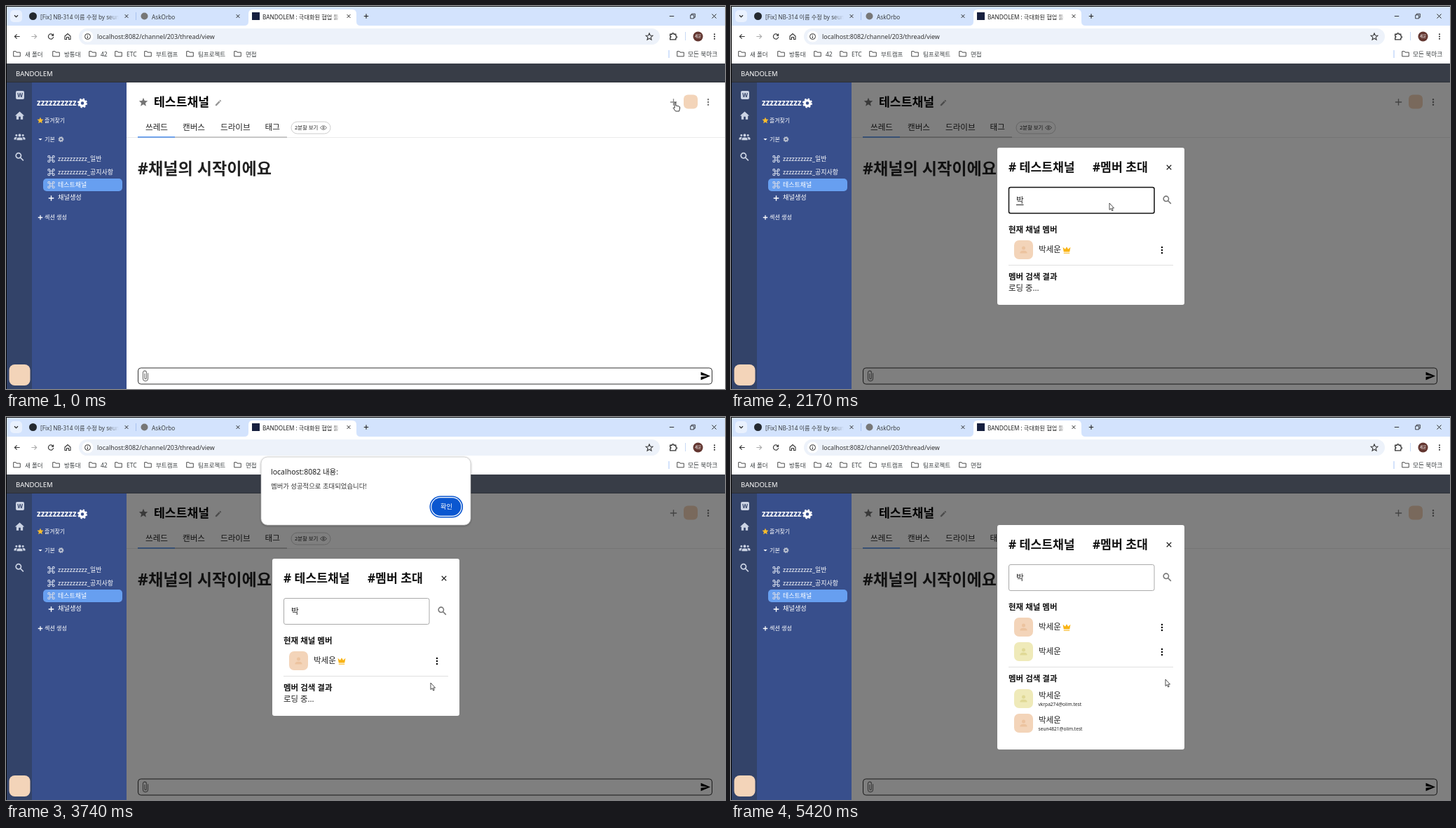
Recreate the animation shown at these times as an HTML page. Size 1026 by 546 pixels, loop 6.28 s.

```html
<!DOCTYPE html>
<html lang="ko">
<head>
<meta charset="utf-8">
<title>Channel invite</title>
<style>
html, body { margin: 0; width: 100%; height: 100%; overflow: hidden; background: #fff; }
svg { display: block; width: 100vw; height: 100vh; font-family: "Noto Sans", "Noto Sans CJK KR", "Noto Sans CJK", sans-serif; }
text { white-space: pre; }
</style>
</head>
<body>
<svg id="stage" viewBox="0 0 1026 546" preserveAspectRatio="none"></svg>
<script>
const LOOP = 6280;
const stage = document.getElementById('stage');

const ICONS = {
  home: 'M10 20v-6h4v6h5v-8h3L12 3 2 12h3v8z',
  person: 'M12 12a4 4 0 1 0 0-8 4 4 0 0 0 0 8zm0 2c-2.7 0-8 1.3-8 4v2h16v-2c0-2.7-5.3-4-8-4z',
  group: 'M12 11.5a3 3 0 1 0 0-6 3 3 0 0 0 0 6zm0 1.5c-3 0-6 1.3-6 3.5V19h12v-2.500c0-2.200-3-3.500-6-3.500zM5 11a2.300 2.300 0 1 0 0-4.600A2.300 2.300 0 0 0 5 11zm14 0a2.300 2.300 0 1 0 0-4.600 2.300 2.300 0 0 0 0 4.600zM5 12.500c-2.500 0-5 1-5 3V18h4.500c0-2.500.5-4 2-5.300zm14 0c2.500 0 5 1 5 3V18h-4.500c0-2.500-.5-4-2-5.300z',
  star: 'M12 17.3l6.200 3.700-1.600-7L22 9.200l-7.200-.6L12 2 9.200 8.600 2 9.200 7.500 14l-1.700 7z',
  pencil: 'M3 17.200V21h3.800L17.800 9.900l-3.700-3.700zM20.700 7a1 1 0 0 0 0-1.400l-2.300-2.300a1 1 0 0 0-1.400 0l-1.900 1.800 3.800 3.800z',
  send: 'M2 21L23 12 2 3v7l15 2-15 2z',
  crown: 'M5 16L3 5l5.500 5L12 4l3.500 6L21 5l-2 11zm0 2h14v2H5z',
  dots: 'M12 8a2 2 0 1 0 0-4 2 2 0 0 0 0 4zm0 6a2 2 0 1 0 0-4 2 2 0 0 0 0 4zm0 6a2 2 0 1 0 0-4 2 2 0 0 0 0 4z',
  caret: 'M5 9h14l-7 7z'
};
const LINES = {
  search: 'M15 9.500a5.500 5.500 0 1 1-11 0 5.500 5.500 0 0 1 11 0zM13.500 13.500L20 20',
  command: 'M9 9V6.500A2.500 2.500 0 1 0 6.500 9H17.500A2.500 2.500 0 1 0 15 6.500V17.500A2.500 2.500 0 1 0 17.500 15H6.500A2.500 2.500 0 1 0 9 17.500z',
  plus: 'M12 5v14M5 12h14',
  cross: 'M6 6l12 12M18 6L6 18',
  chevron: 'M6 9l6 6 6-6',
  back: 'M20 12H5M11 5l-7 7 7 7',
  forward: 'M4 12h15M13 5l7 7-7 7',
  reload: 'M19 8A8 8 0 1 0 20 13M20 3v6h-6',
  house: 'M4 11l8-7 8 7v9h-5v-6H9v6H4z',
  folder: 'M2 5h7l2 3h11v12H2z',
  star: 'M12 17l5.500 3.500-1.500-6.500 5-4.200-6.500-.5L12 3.500 9.500 9.300l-6.500.5L8 14l-1.500 6.500z',
  puzzle: 'M4 6h5c0-4 5-4 5 0h5v5c4 0 4 5 0 5v4H4v-5c3 0 3-4 0-4z',
  eye: 'M1 12c5-9 17-9 22 0-5 9-17 9-22 0zM15 12a3 3 0 1 1-6 0 3 3 0 0 1 6 0z',
  clip: 'M17 6v11a5 5 0 0 1-10 0V5a3.500 3.500 0 0 1 7 0v11a1.800 1.800 0 0 1-3.600 0V7',
  minus: 'M5 12h14',
  restore: 'M4 8h12v12H4zM8 8V4h12v12h-4'
};

const place = (x, y, size) => `transform="translate(${x - size / 2} ${y - size / 2}) scale(${size / 24})"`;
const icon = (name, x, y, size, fill) => `<path d="${ICONS[name]}" ${place(x, y, size)} fill="${fill}"/>`;
const line = (name, x, y, size, color, width = 2) =>
  `<path d="${LINES[name]}" ${place(x, y, size)} fill="none" stroke="${color}" stroke-width="${width}"/>`;
const rect = (x, y, w, h, fill, r = 0, more = '') =>
  `<rect x="${x}" y="${y}" width="${w}" height="${h}" rx="${r}" fill="${fill}" ${more}/>`;
const dot = (x, y, r, fill, more = '') => `<circle cx="${x}" cy="${y}" r="${r}" fill="${fill}" ${more}/>`;
// y is the optical middle of the line
const text = (x, y, str, size, fill = '#111', weight = 400, more = '') =>
  `<text x="${x}" y="${y + size * .37}" font-size="${size}" fill="${fill}" font-weight="${weight}" ${more}>${str}</text>`;
const group = (id, body, more = '') => `<g id="${id}" ${more}>${body}</g>`;

function gear(x, y, r, color) {
  const tooth = 2 * Math.PI * r * .8 / 16;
  return dot(x, y, r * .56, 'none', `stroke="${color}" stroke-width="${r * .48}"`) +
    dot(x, y, r * .8, 'none', `stroke="${color}" stroke-width="${r * .4}" stroke-dasharray="${tooth}"`);
}

const PEACH = ['#f3d4b9', '#ecc39f'], LEMON = ['#efeab9', '#e0d996'];
const avatar = (y, [back, front]) => rect(404, y - 13.5, 27, 27, back, 7) + icon('person', 417.5, y, 15, front);

function browser() {
  const ink = '#3c4043';
  const folders = [[10, '새 폴더'], [66, '방통대'], [118, '42'], [155, 'ETC'], [197, '부트캠프'], [257, '팀프로젝트'], [325, '면접']];
  return rect(0, 0, 1026, 28, '#d3e3fd') + rect(0, 28, 1026, 54, '#fff') +
    rect(6, 6, 17, 17, '#e9f1fe', 5) + line('chevron', 14.5, 14.5, 10, '#222', 2.6) +
    `<path d="M340 28q6 0 6-6V11q0-6 6-6H494q6 0 6 6v11q0 6 6 6z" fill="#fff"/>` +
    dot(38.5, 14.5, 5.5, '#24292f') + dot(197.5, 14.5, 5, '#777') + rect(351, 9, 11, 11, '#17203f') +
    `<g mask="url(#tabFade)">` + text(49, 15.5, '[Fix] NB-314 이름 수정 by seun', 8.2, ink) +
    text(366, 15.5, 'BANDOLEM : 극대화된 협업 툴', 8.2, '#222') + '</g>' +
    text(208, 15.5, 'AskOrbo', 8.2, ink) +
    [172, 331, 489].map(x => line('cross', x, 14.5, 9.500, '#222', 2.4)).join('') +
    rect(185, 9, 1, 11, '#a9c3ef') + line('plus', 514, 14.5, 11, '#222', 2.4) +
    line('minus', 950, 14.5, 11, '#222') + line('restore', 980, 14.5, 10, '#222') + line('cross', 1010.5, 14.5, 12, '#222') +
    line('back', 16, 43.5, 11, '#333', 2.4) + line('forward', 40, 43.5, 11, '#aaa', 2.4) +
    line('reload', 64, 43.5, 11, '#333', 2.4) + line('house', 88, 43.5, 12, '#333', 2.2) +
    rect(104, 32, 829, 23, '#edf2fa', 11.5) + dot(116.5, 43.5, 8, '#fff') +
    dot(116.5, 43.5, 4, 'none', 'stroke="#333"') + rect(116, 43, 1, 3, '#333') + rect(116, 41, 1, 1, '#333') +
    text(130, 43.5, 'localhost:8082/channel/203/thread/view', 8.9, '#333') +
    line('star', 918, 43.5, 13, '#333') + line('puzzle', 952, 43.5, 13, '#333', 2.4) + rect(969, 37, 1, 12, '#c8d9f5') +
    dot(987.5, 43.5, 7, '#633630') + text(987.5, 43.5, '세운', 5.3, '#fff', 400, 'text-anchor="middle"') +
    icon('dots', 1011, 43.5, 13, '#333') +
    folders.map(([x, s]) => line('folder', x + 5.5, 68, 11.5, '#444') + text(x + 17, 68.5, s, 8.5, ink)).join('') +
    rect(945.5, 63, 1, 11, '#a9c8f7') + line('folder', 962.5, 68, 11.5, '#444') + text(973, 68.5, '모든 북마크', 8.7, ink);
}

function sidebar() {
  const pale = '#cbd3e3';
  return rect(0, 82, 1026, 27, '#383d47') + rect(0, 108, 1026, 1, '#2c3037') + text(14, 96.500, 'BANDOLEM', 9.5, '#fff') +
    rect(0, 109, 37, 437, '#334369') + rect(37, 109, 135, 437, '#384f8c') +
    rect(14, 121, 12, 12, pale, 2) + text(20, 127, 'W', 8, '#334369', 700, 'text-anchor="middle"') +
    icon('home', 19.5, 156.5, 16, pale) + icon('group', 19.5, 186.500, 16, pale) + line('search', 19.5, 215, 16, pale, 2.6) +
    rect(4.500, 511, 30, 30, PEACH[0], 8) +
    text(44, 138, 'zzzzzzzzzz', 11.6, '#fff', 700) + gear(109, 138.5, 7, '#fff') +
    icon('star', 49, 163, 11, '#f9bd2c') + text(55, 163, '즐겨찾기', 7.9, '#fff') +
    icon('caret', 49, 190, 9, '#fff') + text(55, 190, '기본', 8.1, '#fff') + gear(78.5, 190, 4, '#b8bfce') +
    rect(53, 246, 113, 18, '#679ff0', 5) +
    [[218, 'zzzzzzzzzz_일반'], [237, 'zzzzzzzzzz_공지사항'], [255, '테스트채널']].map(([y, s]) =>
      line('command', 64.5, y, 14, '#cdd5e6') + text(74, y, s, 8.95, '#fff')).join('') +
    line('plus', 64.5, 274, 13, '#fff', 2.5) + text(74, 273, '채널생성', 9.2, '#fff') +
    line('plus', 49, 301.5, 11, '#fff', 2.8) + text(55, 301.500, '섹션 생성', 8.1, '#fff');
}

function channel() {
  const tabs = [[199, '쓰레드'], [252, '캔버스'], [306, '드라이브'], [369.5, '태그']];
  return rect(172, 109, 854, 437, '#fff') +
    icon('star', 196, 137, 15, '#757575') + text(211, 137, '테스트채널', 17.2, '#000', 700) + icon('pencil', 303, 138, 11, '#999') +
    line('plus', 952.5, 137, 16, '#888', 2) + rect(967, 126.5, 20, 20, PEACH[0], 6) + icon('dots', 1002, 137, 15, '#777') +
    rect(172, 187, 854, 1, '#ebebeb') + rect(188, 186.5, 213, 1, '#999') + rect(188, 186, 53, 1.6, '#5b98f0') +
    tabs.map(([x, s]) => text(x, 173, s, 11.6, '#222')).join('') +
    rect(407, 165, 56, 17, '#fff', 8.500, 'stroke="#ccc"') + text(412, 173, '2분할 보기', 7.4, '#222') + line('eye', 453, 173.5, 9.5, '#444') +
    text(188, 231, '#채널의 시작이에요', 23.1, '#222', 700) +
    rect(188.5, 516, 819, 23, '#fff', 4, 'stroke="#333"') + line('clip', 199, 527.5, 17, '#777', 1.6) + icon('send', 998, 527.5, 15.500, '#000');
}

// coordinates inside the modal are relative to its top edge
function modal() {
  const member = (y, pair) => avatar(y, pair) + text(439, y - .5, '박세운', 11.5, '#222') + icon('dots', 615, y + .5, 16, '#111');
  const result = (y, pair, mail) => avatar(y, pair) + text(439, y - 5, '박세운', 11.5, '#222') + text(438.5, y + 8, mail, 6.6, '#222');
  return rect(380, 0, 267, 208, '#fff', 3, 'id="card"') +
    text(396, 28, '# 테스트채널', 17.2, '#111', 700) + text(516, 28, '#멤버 초대', 17.2, '#111', 700) +
    line('cross', 625, 28, 13, '#222', 2.2) +
    rect(396.5, 56.5, 207.500, 37, '#fff', 2.5, 'id="field" stroke="#aaa"') +
    text(407, 75, '멤버 찾기', 11.6, '#aaa', 400, 'id="query"') + rect(407, 81, 10.5, 1, '#222', 0, 'id="underline"') +
    line('search', 622.500, 74.5, 16, '#777', 2.4) +
    text(396, 116.5, '현재 채널 멤버', 11.5, '#111', 700) +
    member(145.5, PEACH) + icon('crown', 479, 146, 14.500, '#f9b414') +
    group('added', member(180.5, LEMON)) +
    group('lower', rect(396, 167, 235, 1, '#e0e0e0') + text(396, 183.5, '멤버 검색 결과', 11.5, '#111', 700) +
      group('loading', text(396, 199.5, '로딩 중...', 11.4, '#222')) +
      group('first', result(212.5, LEMON, 'vkrpa274@olim.test') +
        group('invite', dot(607, 214, 15.5, '#fff', 'id="inviteFace" filter="url(#soft)"') + line('plus', 607, 214, 16, '#222', 2.2))) +
      group('second', result(247.5, PEACH, 'seun4821@olim.test')));
}

function alertBox() {
  return rect(364, 57, 299, 97, '#fff', 9, 'stroke="#bbb" stroke-width=".6" filter="url(#soft)"') +
    text(378, 78.500, 'localhost:8082 내용:', 10.5, '#1f1f1f') + text(378, 98.5, '멤버가 성공적으로 초대되었습니다!', 9.4, '#333') +
    rect(605.3, 113.3, 46, 29.500, '#fff', 14.7, 'stroke="#0b57d0" stroke-width="1.6"') +
    rect(607.3, 115.3, 42, 25.5, '#0b57d0', 12.7, 'id="confirm"') +
    text(628.5, 128, '확인', 9.300, '#fff', 400, 'text-anchor="middle"');
}

stage.innerHTML = `<defs>
  <filter id="soft" x="-20%" y="-20%" width="140%" height="150%"><feDropShadow dx="0" dy="1" stdDeviation="1.6" flood-opacity=".35"/></filter>
  <linearGradient id="fadeOut"><stop offset="0" stop-color="#fff"/><stop offset="1" stop-color="#000"/></linearGradient>
  <mask id="tabFade" maskUnits="userSpaceOnUse" x="0" y="0" width="1026" height="30">
    ${rect(0, 0, 145, 30, '#fff') + rect(145, 0, 16, 30, 'url(#fadeOut)') + rect(346, 0, 117, 30, '#fff') + rect(463, 0, 16, 30, 'url(#fadeOut)')}
  </mask></defs>` +
  channel() + rect(172, 109, 854, 437, '#000', 0, 'id="shade"') + browser() + sidebar() +
  rect(0, 0, 1, 546, '#000') + rect(0, 0, 1026, 1, '#111') +
  group('modal', modal()) + group('alert', alertBox()) +
  group('cursor', dot(1.5, 2, 8, '#d9dc28', 'id="press" fill-opacity=".65"') +
    `<path id="arrow" d="M0 0V9.500L2.200 7.600 3.700 11 5.200 10.300 3.700 7.100H6.500z" fill="#fff" stroke="#222" stroke-width=".8"/>
     <path id="hand" d="M-.9 1Q0-.6.9 1V5L5.500 6Q7 6.500 6.500 9L5.500 13H.5L-2.800 8.500Q-2.600 7-.9 8.300z" fill="#fff" stroke="#222" stroke-width=".9"/>`);

const el = Object.fromEntries([...stage.querySelectorAll('[id]')].map(node => [node.id, node]));
const set = (id, attrs) => { for (const k in attrs) el[id].setAttribute(k, attrs[k]); };
const show = (id, on) => { el[id].style.display = on ? '' : 'none'; };
const within = (t, from, to) => t >= from && t < to;
const ramp = (t, from, to) => Math.min(1, Math.max(0, (t - from) / (to - from)));
const ease = p => 1 - (1 - p) ** 3;

const PATH = [
  [0, 955, 137], [600, 955, 137], [780, 780, 200], [950, 607, 264], [1100, 556, 279], [1250, 540, 281],
  [2320, 540, 281], [2670, 568, 322], [3040, 605, 380], [3690, 605, 380], [3740, 606, 379], [4000, 606, 379],
  [4350, 616, 240], [4650, 623, 122], [4920, 623, 122], [5120, 622, 250], [5320, 620, 360], [5420, 620, 374], [LOOP, 620, 374]
];
const CARD = [[0, 208, 'empty'], [2020, 224, 'loading'], [2220, 290, 'results'], [3290, 224, 'loading'], [4970, 320, 'final']];
const QUERY = [[0, '멤버 찾기'], [1600, 'ㅂ'], [1700, '바'], [1800, '박']];
const PRESSES = [[150, 300], [1350, 1450], [3040, 3140], [4700, 4920]];
const latest = (table, t) => table.filter(row => row[0] <= t).pop();

function pointAt(t) {
  const i = PATH.findIndex(row => row[0] > t);
  const [t0, x0, y0] = PATH[i - 1], [t1, x1, y1] = PATH[i];
  const p = ramp(t, t0, t1);
  return [x0 + (x1 - x0) * p, y0 + (y1 - y0) * p];
}

function draw(t) {
  const open = ease(ramp(t, 170, 500));
  const [, height, state] = latest(CARD, t);
  const listed = state === 'results' || state === 'final', final = state === 'final';
  const top = 314 - height / 2, scale = .9 + .1 * open;
  set('shade', { opacity: open * .5 });
  set('modal', { opacity: open, transform: `translate(513.5 314) scale(${scale}) translate(-513.5 ${top - 314})` });
  set('card', { height });
  set('lower', { transform: `translate(0 ${final ? 35 : 0})` });
  set('second', { transform: `translate(0 ${final ? 0 : 5})` });
  set('first', { transform: `translate(0 ${final ? 0 : 2})` });
  show('added', final);
  show('loading', state === 'loading');
  show('first', listed);
  show('second', listed);
  show('invite', state === 'results');
  set('inviteFace', { fill: within(t, 2900, 3290) ? '#f3f3f3' : '#fff' });

  const focused = within(t, 1400, 3040), hovered = within(t, 1000, 1400);
  set('field', { stroke: focused ? '#111' : hovered ? '#333' : '#aaa', 'stroke-width': focused ? 1.5 : 1 });
  el.query.textContent = latest(QUERY, t)[1];
  set('query', { fill: t < 1600 ? '#aaa' : '#222' });
  show('underline', within(t, 1600, 3040));

  show('alert', within(t, 3390, 4970));
  set('alert', { opacity: .25 + .75 * ramp(t, 3390, 3560) - ramp(t, 4920, 4990) });
  set('confirm', { fill: t >= 4620 ? '#2566cf' : '#0b57d0' });

  const [x, y] = pointAt(t), pointing = t < 300 || within(t, 2900, 3290);
  set('cursor', { transform: `translate(${x} ${y})` });
  show('hand', pointing);
  show('arrow', !pointing);
  show('press', PRESSES.some(([from, to]) => within(t, from, to)));
}

function frame() {
  draw(performance.now() % LOOP);
  requestAnimationFrame(frame);
}
frame();
</script>
</body>
</html>
```
